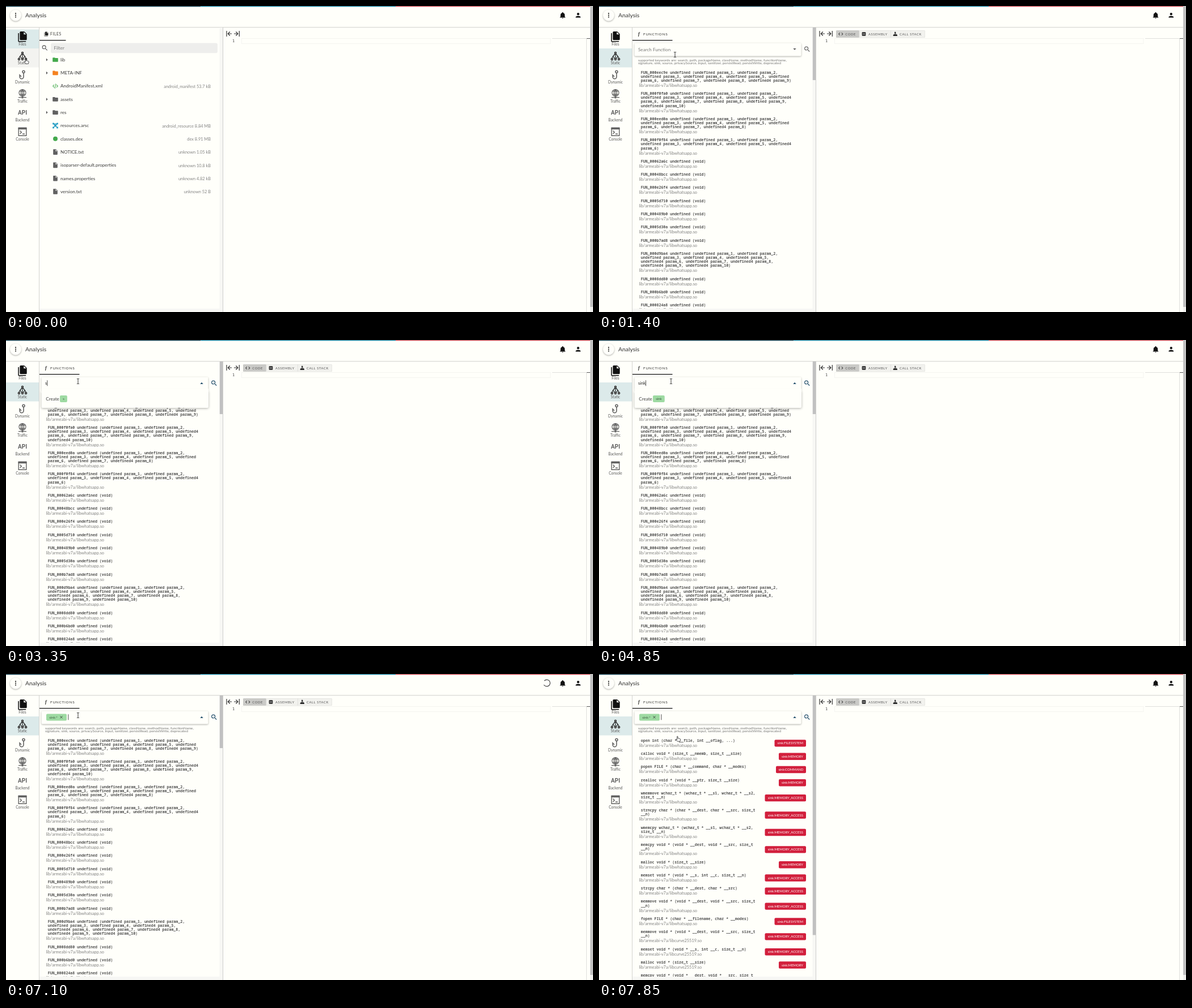
Animation of 1035 by 541 pixels, one loop 8 s. Source, as an HTML page with a canvas:

```html
<!DOCTYPE html>
<html lang="en">
<head>
<meta charset="utf-8">
<title>Analysis</title>
<style>
html, body { margin: 0; width: 100%; height: 100%; overflow: hidden; background: #fffffa; }
canvas { display: block; width: 1035px; height: 541px; }
</style>
</head>
<body>
<canvas id="stage" width="1035" height="541"></canvas>
<script>
const ctx = document.getElementById('stage').getContext('2d');
const LOOP = 8000, TICK = 50;
const BG = '#fffffa', INK = '#3c3c3c', GREY = '#616161', SOFT = '#858585', GREEN = '#9edaa2', RED = '#d21f3c';
const SANS = 'Lato, sans-serif', MONO = '"Noto Sans Mono", monospace';

// Icons on a 24-unit grid
const ICON = {
  files: 'M15,7H20.5L15,1.5V7M8,0H16L22,6V18A2,2 0 0,1 20,20H8C6.89,20 6,19.1 6,18V2A2,2 0 0,1 8,0M4,4V22H20V24H4A2,2 0 0,1 2,22V4H4Z',
  bell: 'M21,19V20H3V19L5,17V11C5,7.9 7.03,5.17 10,4.29V4A2,2 0 0,1 14,4V4.29C16.97,5.17 19,7.9 19,11V17L21,19M14,21A2,2 0 0,1 10,21Z',
  user: 'M12,4A4,4 0 0,1 12,12A4,4 0 0,1 12,4M12,14C16.42,14 20,15.79 20,18V20H4V18C4,15.79 7.58,14 12,14Z',
  search: 'M9.5,3A6.5,6.5 0 0,1 16,9.5C16,11.11 15.41,12.59 14.44,13.73L14.71,14H15.5L20.5,19L19,20.5L14,15.5V14.71L13.73,14.44C12.59,15.41 11.11,16 9.5,16A6.5,6.5 0 0,1 9.5,3M9.5,5C7,5 5,7 5,9.5C5,12 7,14 9.5,14C12,14 14,12 14,9.5C14,7 12,5 9.5,5Z',
  folder: 'M10,4H4C2.89,4 2,4.89 2,6V18A2,2 0 0,0 4,20H20A2,2 0 0,0 22,18V8C22,6.89 21.1,6 20,6H12L10,4Z',
  file: 'M13,9V3.5L18.5,9M6,2C4.89,2 4,2.89 4,4V20A2,2 0 0,0 6,22H18A2,2 0 0,0 20,20V8L14,2H6Z',
  xml: 'M12.89,3L14.85,3.4L11.11,21L9.15,20.6L12.89,3M19.59,12L16,8.41V5.58L22.42,12L16,18.41V15.58L19.59,12M1.58,12L8,5.58V8.41L4.41,12L8,15.58V18.41L1.58,12Z',
  code: 'M14.6,16.6L19.2,12L14.6,7.4L16,6L22,12L16,18L14.6,16.6M9.4,16.6L4.8,12L9.4,7.4L8,6L2,12L8,18L9.4,16.6Z',
  right: 'M10,17L15,12L10,7V17Z',
  down: 'M7,9.5L12,14.5L17,9.5H7Z',
  tree: 'M12,2L15,5V9H13V12H18V15H21V21H15V15H16V14H13V15H15V21H9V15H11V14H8V15H9V21H3V15H6V12H11V9H9V3Z',
  hand: 'M8,2C9,1 11,1 11,3V9L18,10.5C20,11 21,12 21,14L19.5,21H9.5L4,15C3,13.5 5,12 6.5,13.5L8,14.5Z'
};
for (const k in ICON) ICON[k] = new Path2D(ICON[k]);

const FILES = [
  ['lib', 'folder', '#43a94b'], ['META-INF', 'folder', '#f58220'],
  ['AndroidManifest.xml', 'xml', '#43a94b', 'android_manifest 53.7 kB'],
  ['assets', 'folder', GREY], ['res', 'folder', GREY],
  ['resources.arsc', 'nodes', '#2a9fc4', 'android_resource 8.84 MB'],
  ['classes.dex', 'dot', '#43a94b', 'dex 8.91 MB'],
  ['NOTICE.txt', 'file', GREY, 'unknown 1.05 kB'],
  ['isoparser-default.properties', 'file', GREY, 'unknown 10.8 kB'],
  ['names.properties', 'file', GREY, 'unknown 4.82 kB'],
  ['version.txt', 'file', GREY, 'unknown 52 B']
];

// address, parameter count, positions of the 4-byte parameters
const params = (n, wide) => Array.from({ length: n }, (_, i) =>
  `undefined${wide.includes(i + 1) ? 4 : ''} param_${i + 1}`).join(', ') || 'void';
const ALL = [
  ['000eec9e', 9, [8, 9]], ['000f0fa0', 10, [6, 10]], ['000eed0a', 8, [8]], ['000f0f84', 6, [6]],
  ['00062a6c'], ['00048bcc'], ['000e26f4'], ['0005d710'], ['000489b0'], ['0005d30a'], ['000b7ad8'],
  ['000d9ba4', 10, [5, 6, 7, 8, 9, 10]], ['0008dd80'], ['000b6bd0'], ['000824a8']
].map(([a, n = 0, w = []]) => ({ lines: wrap(`FUN_${a} undefined (${params(n, w)})`, 67), lib: 'whatsapp' }));

const SINKS = [
  ['open int (char * __file, int __oflag, ...)', 'FILESYSTEM'],
  ['calloc void * (size_t __nmemb, size_t __size)', 'MEMORY'],
  ['popen FILE * (char * __command, char * __modes)', 'COMMAND'],
  ['realloc void * (void * __ptr, size_t __size)', 'MEMORY'],
  ['wmemmove wchar_t * (wchar_t * __s1, wchar_t * __s2, size_t __n)'],
  ['strncpy char * (char * __dest, char * __src, size_t __n)'],
  ['wmemcpy wchar_t * (wchar_t * __s1, wchar_t * __s2, size_t __n)'],
  ['memcpy void * (void * __dest, void * __src, size_t __n)'],
  ['malloc void * (size_t __size)', 'MEMORY'],
  ['memset void * (void * __s, int __c, size_t __n)'],
  ['strcpy char * (char * __dest, char * __src)'],
  ['memmove void * (void * __dest, void * __src, size_t __n)'],
  ['fopen FILE * (char * __filename, char * __modes)', 'FILESYSTEM'],
  ['memmove void * (void * __dest, void * __src, size_t __n)'],
  ['memset void * (void * __s, int __c, size_t __n)'],
  ['malloc void * (size_t __size)', 'MEMORY'],
  ['memcpy void * (void * __dest, void * __src, size_t __n)']
].map(([sig, tag = 'MEMORY_ACCESS'], i) => ({ lines: wrap(sig, 54), tag, lib: i < 13 ? 'whatsapp' : 'curve25519' }));
const TAG_W = { FILESYSTEM: 55.5, MEMORY: 48, COMMAND: 53, MEMORY_ACCESS: 72.5 };

const TYPED = [[3350, 's'], [3500, 'si'], [3700, 'sin'], [3800, 'sink'], [4250, 'sink*'], [4850, 'sink'], [5050, 'sink:'], [6050, 'sink:*']];

function wrap(s, max) {
  const out = [''];
  for (const w of s.split(' ')) {
    const last = out.length - 1, next = out[last] ? out[last] + ' ' + w : w;
    if (next.length > max) out.push(w); else out[last] = next;
  }
  return out;
}

const clamp = x => Math.max(0, Math.min(1, x));
const mix = (a, b, p) => a + (b - a) * p;
const ease = p => p * p * (3 - 2 * p);
const ramp = (t, a, b) => ease(clamp((t - a) / (b - a)));

function text(s, x, y, size, color = INK, { align = 'left', weight = 400, font = SANS, gap = 0 } = {}) {
  ctx.font = `${weight} ${size}px ${font}`;
  ctx.letterSpacing = gap + 'px';
  ctx.textAlign = align;
  ctx.fillStyle = color;
  ctx.fillText(s, x, y + size * 0.35);
}
function box(x, y, w, h, color, r = 0) {
  ctx.fillStyle = color;
  ctx.beginPath();
  ctx.roundRect(x, y, w, h, r);
  ctx.fill();
}
function dot(x, y, r, color) {
  ctx.fillStyle = color;
  ctx.beginPath();
  ctx.arc(x, y, r, 0, 7);
  ctx.fill();
}
function stroke(d, color, width = 1) {
  ctx.strokeStyle = color;
  ctx.lineWidth = width;
  ctx.stroke(new Path2D(d));
}
function icon(name, x, y, scale, color, turn = 0, outline) {
  ctx.save();
  ctx.translate(x, y);
  ctx.rotate(turn);
  ctx.scale(scale, scale);
  ctx.translate(-12, -12);
  ctx.fillStyle = color;
  ctx.fill(ICON[name]);
  if (outline) { ctx.strokeStyle = outline; ctx.lineWidth = 1.7; ctx.stroke(ICON[name]); }
  ctx.restore();
}
function raised(x, y, w, h, r, blur = 3, dy = 1) {
  ctx.save();
  ctx.shadowColor = 'rgba(0,0,0,.32)';
  ctx.shadowBlur = blur;
  ctx.shadowOffsetY = dy;
  box(x, y, w, h, BG, r);
  ctx.restore();
}

function header(t) {
  box(0, 0, 343.5, 1.2, '#07374a');
  box(343.5, 0, 343.5, 1.2, '#1083a3');
  box(687, 0, 343, 1.2, '#cf4650');
  raised(7, 6.5, 20, 20, 10);
  for (const d of [-3.2, 0, 3.2]) dot(17, 16.3 + d, 1.1, '#222');
  text('Analysis', 34, 16.5, 10.4, '#333');
  icon('bell', 981.5, 16.3, 0.54, '#111');
  icon('user', 1008.8, 16.3, 0.54, '#111');
  box(0, 37.3, 1030, 0.9, '#cfcfcb');
  if (t >= 800 && t < 1350) spinner(t - 745);
  if (t >= 6400 && t < 7150) spinner(t - 6400);
}
function spinner(age) {
  const p = age / 1400 % 1, turn = p * Math.PI * 2, unit = Math.PI * 2 / 125.6;
  const grow = ease(clamp(p * 2)), slide = ease(clamp(p * 2 - 1));
  const start = mix(15 * grow, 125, slide);
  const end = Math.min(125.6, start + mix(1, 100, grow));
  ctx.strokeStyle = '#444';
  ctx.lineWidth = 1.2;
  ctx.beginPath();
  ctx.arc(953.5, 16, 5.9, turn + start * unit, turn + end * unit);
  ctx.stroke();
}

function sidebar(t) {
  const p = ramp(t, 750, 1050), tint = a => `rgba(205,225,228,${a * 0.7})`;
  box(0, 41.5, 58, 33.5, t < 800 ? tint(1) : `rgba(225,228,226,${0.9 * (1 - p)})`);
  box(0, 75, 58, 33.5, t < 800 ? '#f3f3f0' : t < 1150 ? '#e4e8e6' : tint(1));
  ['Files', 'Static', 'Dynamic', 'Traffic', 'Backend', 'Console'].forEach((s, i) =>
    text(s, 29, 67.4 + 33.6 * i, 6.7, '#5c5c5c', { align: 'center' }));
  icon('files', 29, 54.2, 0.77, '#111');

  stroke('M29 84V93M28 85L24.5 89L22.7 93M30 85L33.5 89L35.3 93M25 89L27.5 93M33 89L30.5 93', '#222', 1.2);
  for (const [x, y] of [[29, 83], [22.9, 94], [29, 94], [35.1, 94]]) {
    dot(x, y, 2.2, '#222');
    dot(x, y, 0.8, BG);
  }
  stroke('M33 116.3A2 2 0 1 1 29 116.3A2 2 0 1 1 33 116.3M31 118.3V125.3A3.4 3.4 0 0 1 24.2 125.3V122L27 125', GREY, 1.6);
  stroke('M35 153.5A6 6 0 1 1 23 153.5A6 6 0 1 1 35 153.5M29 147.5V161M23.8 150.7H34.2M23.8 156.3H34.2M29 147.5C25.5 150 25.5 157 29 159.5C32.5 157 32.5 150 29 147.5M22 161.7H36', GREY, 1.2);
  dot(29, 161.7, 1.7, GREY);
  text('API', 29, 188.3, 10, GREY, { align: 'center', weight: 700, font: 'Roboto, sans-serif' });
  stroke('M22.2 215.5H35.8V229.2H22.2Z', GREY, 1.4);
  box(21.5, 214.8, 15, 3.4, GREY, 1);
  stroke('M24.5 220.5L27.3 223.2L24.5 226M29 226.3H33', GREY, 1.4);
  box(58, 38, 0.9, 503, '#cfcfcb');
}

function filesPanel() {
  icon('files', 71, 49.5, 0.34, '#222');
  text('FILES', 78, 50, 6.6, '#333', { gap: 0.7 });
  icon('search', 68.5, 74.2, 0.54, '#555');
  box(79, 65.5, 294, 17.7, '#eeeeec', 3);
  text('Filter', 84.5, 74.5, 8, '#777');
  FILES.forEach(([name, kind, color, info], i) => {
    const y = 95 + 23.3 * i;
    if (kind === 'dot') dot(87, y, 4, color);
    else if (kind === 'nodes') {
      stroke(`M83.5 ${y - 3.5}L90.5 ${y + 3.5}M90.5 ${y - 3.5}L83.5 ${y + 3.5}M84 ${y - 3}H90`, color, 1.3);
      for (const dx of [-3.5, 3.5]) for (const dy of [-3.5, 3.5]) box(87 + dx - 1.4, y + dy - 1.4, 2.8, 2.8, color);
      dot(87, y, 2, color);
    } else icon(kind, 87, y, 0.48, color);
    if (kind === 'folder') icon('right', 72, y, 0.52, '#555');
    text(name, 96, y, 8.1);
    if (info) text(info, 361, y + 0.8, 7.4, SOFT, { align: 'right' });
  });
}

function chip(s, x, y, w, closable) {
  box(x, y, w, 12, GREEN, 2);
  text(s, x + 5.2, y + 6, 6, '#3d5c40');
  if (closable) stroke(`M${x + 24.5} ${y + 4}l4 4m0 -4l-4 4`, '#333', 0.9);
}

function rows(list) {
  ctx.save();
  ctx.beginPath();
  ctx.rect(59, 108, 317, 427);
  ctx.clip();
  let y = 117.4;
  for (const { lines, tag, lib } of list) {
    const extra = 7.1 * (lines.length - 1);
    lines.forEach((s, i) => text(s, 73.8, y + 7.1 * i, 6.6, '#545454', { font: MONO, weight: 600 }));
    text(`lib/armeabi-v7a/lib${lib}.so`, 70.5, y + extra + 8.8, 7.4, '#828282');
    if (tag) {
      const w = TAG_W[tag], mid = y + 5 + extra / 2;
      box(365 - w, mid - 6.2, w, 12.4, RED, 2);
      text('sink:' + tag, 365 - w / 2, mid, 5.9, '#fff', { align: 'center' });
    }
    y += 23.3 + extra;
  }
  ctx.restore();
}

function functionsPanel(t) {
  text('f', 69, 49.5, 8, '#222', { font: '"Liberation Serif", serif', weight: 'italic 700' });
  text('FUNCTIONS', 78, 50, 6.5, '#333', { gap: 0.7 });
  text('supported keywords are: search, path, packageName, className, methodName, functionName,', 69, 95.3, 6.3, '#777');
  text('signature, sink, source, privacySource, input, sanitizer, persistRead, persistWrite, deprecated', 69, 100.4, 6.3, '#777');
  if (t >= 7150) rows(SINKS);
  else if (t >= 1350) rows(ALL);
  if (t >= 1350) box(376.8, 38, 5.2, t < 7150 ? 93 : 423.5, '#c1c1c1');

  raised(62.5, 65.5, 294, 23, 2);
  const focus = ramp(t, 1880, 2200);
  icon('down', 345, 76.3, 0.54, focus > 0.5 ? '#0b3c5d' : '#555', Math.PI * focus);
  icon('search', 367, 76.3, 0.54, focus > 0.5 ? '#0b3c5d' : '#555');

  const entry = TYPED.filter(([at]) => t >= at).pop();
  const open = entry ? 1 - ramp(t, 6300, 6550) : 0;
  let caret = 69.2;
  if (t >= 6350) {
    chip('sink:*', 71, 70.4, 36, true);
    caret = 109.5;
  } else if (entry) {
    text(entry[1], 69, 76.5, 7.5, '#222');
    caret += ctx.measureText(entry[1]).width;
  } else text('Search Function', 69, 77, 8.1, '#777');
  if (t >= 1950) box(caret, 71.3, 0.8, 10, '#222');

  if (open > 0) {
    ctx.globalAlpha = open;
    raised(62.5, 89, 294.5, 31, 2, 4, 1);
    box(62.5, 86, 294.5, 8, BG);
    text('Create', 70.3, 104, 8.1);
    const s = entry[1];
    ctx.font = `6px ${SANS}`;
    chip(s, 95, 98, ctx.measureText(s).width + 10.3);
    ctx.globalAlpha = 1;
  }
}

function editor(t) {
  stroke('M389 44V54M398 49H391.5M394.8 45.5L391.3 49L394.8 52.5M411.3 44V54M402 49H408.7M405.4 45.5L408.9 49L405.4 52.5', '#333', 1.2);
  if (t >= 800) {
    box(418, 43, 157, 13, '#dcdcd8', 1.5);
    box(418.5, 43.5, 156, 12, '#f2f2ee', 1);
    box(418, 43, 40.8, 13, '#cacac7', 1.5);
    box(514, 43, 0.8, 13, '#dcdcd8');
    const label = { gap: 0.55 };
    icon('code', 426.3, 49.5, 0.42, '#222');
    text('CODE', 434.3, 49.8, 5.9, '#555', label);
    box(463.7, 46.2, 6.6, 6.6, '#222', 1);
    stroke('M465.5 48v3M467 48v3M468.5 48v3', '#eee', 0.6);
    text('ASSEMBLY', 475, 49.8, 5.9, '#555', label);
    icon('tree', 522.3, 49.5, 0.4, '#222');
    text('CALL STACK', 530, 49.8, 5.9, '#555', label);
  }
  text('1', 401, 62, 7, '#333', { align: 'center', font: MONO });
  ctx.strokeStyle = '#f4f4f0';
  ctx.lineWidth = 1;
  ctx.strokeRect(415.5, 57.5, 544.5, 9);
  box(963, 57, 61, 0.8, '#d5d5d2');
  box(1024, 57, 6, 1, '#555');
  box(1023, 58, 0.8, 483, '#d8d8d5');
  box(1030, 0, 5, 541, '#f0f0ee');
  box(1030, 0, 5, 532, '#c1c1c1');
}

function pointer(t) {
  let x = mix(36, 134, ramp(t, 1050, 1350)), y = mix(98, 86, ramp(t, 1050, 1350));
  const settle = ramp(t, 1400, 1550), leave = clamp((t - 7700) / 150);
  x = mix(mix(x, 127, settle), 139.5, leave);
  y = mix(mix(y, 73, settle), 115, leave);
  if (x < 59 || leave > 0) icon('hand', x, y, 0.46, '#fff', 0, '#222');
  else stroke(`M${x - 2} ${y - 4.5}h1.4l.6 .6l.6 -.6h1.4M${x} ${y - 4}v8M${x - 2} ${y + 4.5}h1.4l.6 -.6l.6 .6h1.4`, '#222', 0.9);
}

function draw(t) {
  box(0, 0, 1035, 541, BG);
  header(t);
  sidebar(t);
  box(376.5, 38, 5.5, 503, '#f7f7f4');
  box(59, 535, 323, 6, '#f7f7f4');
  box(382, 38, 0.9, 503, '#c9c9c6');
  if (t < 800) filesPanel(); else functionsPanel(t);
  box(59, 60, t < 800 ? 46.5 : mix(46.5, 70.5, ramp(t, 700, 950)), 1.2, '#111');
  editor(t);
  pointer(t);
}

function frame(now) {
  draw(Math.floor(now % LOOP / TICK) * TICK);
  requestAnimationFrame(frame);
}
requestAnimationFrame(frame);
</script>
</body>
</html>
```
